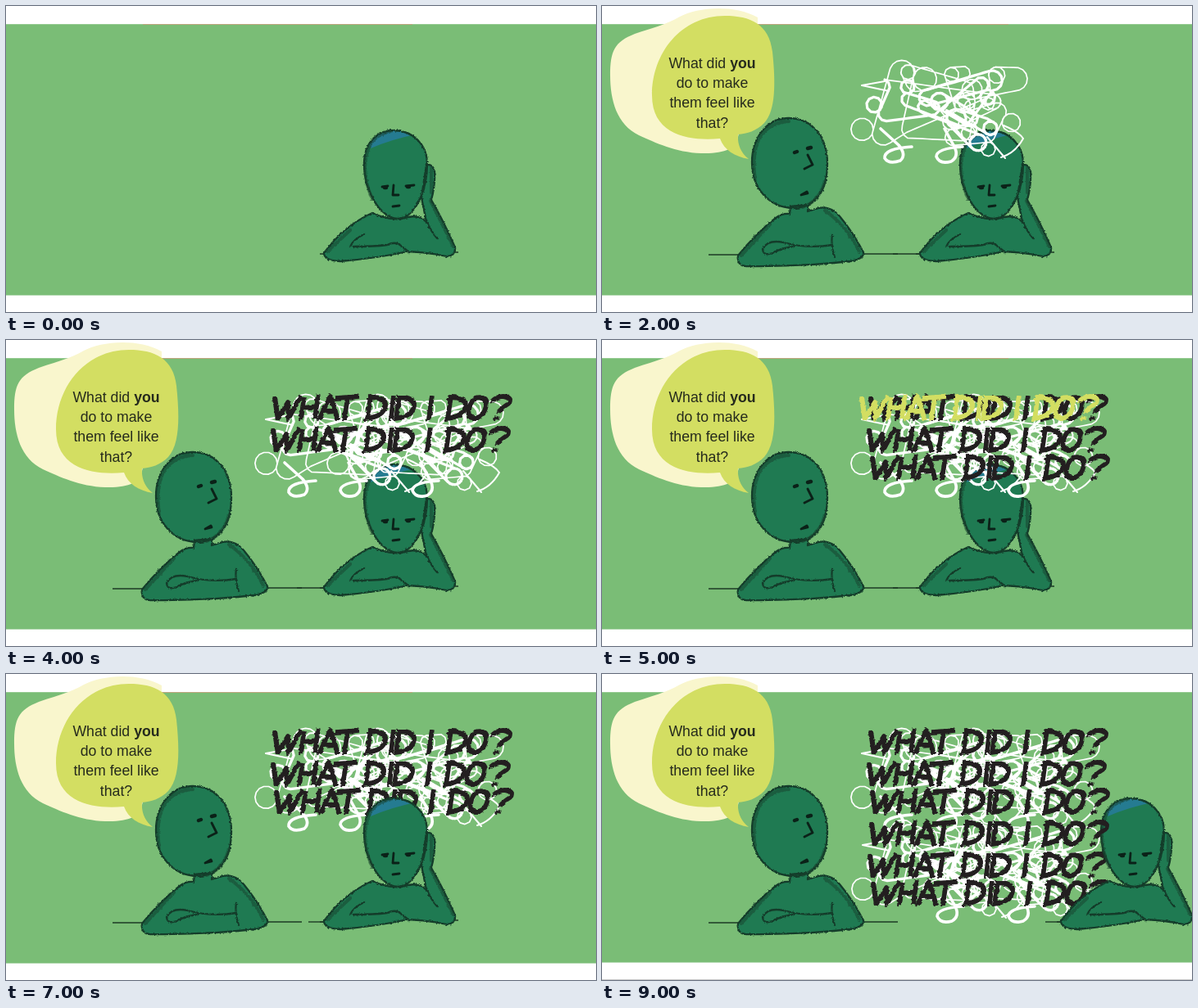
Write an HTML page that moves like this. It is 720 px wide and 374 px high and loops after 9500 ms.

```html
<!DOCTYPE html>
<html lang="en">
<head>
<meta charset="utf-8">
<title>What did I do?</title>
<style>
  html, body { margin: 0; width: 100%; height: 100%; overflow: hidden; background: #fff; }
  svg { display: block; width: 720px; height: 374px; }
  text { font: 17.7px "Liberation Sans", Arial, sans-serif; text-anchor: middle; fill: #262b1d; }
  filter { color-interpolation-filters: sRGB; }
  .skin { fill: #1f7a52; }
  .ink { fill: none; stroke: #143c2a; stroke-width: 2.3; stroke-linecap: round; stroke-linejoin: round; filter: url(#pencil); }
  .shade { stroke: #18402d; stroke-width: 4; opacity: .5; }
  .face { fill: none; stroke: #0b2118; stroke-width: 2.8; stroke-linecap: round; stroke-linejoin: round; }
  .eyes { stroke-width: 4.4; }
  .table { fill: none; stroke: #1c3a25; stroke-width: 1.4; }
  .scrawl { fill: none; stroke: #fff; stroke-linecap: round; stroke-linejoin: round; }
  .brush { fill: none; stroke-width: 5.6; stroke-linejoin: round; filter: url(#dry); }
</style>
</head>
<body>
<svg viewBox="0 0 720 374">
  <defs>
    <filter id="pencil" filterUnits="userSpaceOnUse" x="0" y="0" width="720" height="374">
      <feTurbulence type="fractalNoise" baseFrequency=".4" numOctaves="2" seed="4"/>
      <feDisplacementMap in="SourceGraphic" scale="3" xChannelSelector="R" yChannelSelector="G"/>
    </filter>
    <filter id="dry" filterUnits="userSpaceOnUse" x="-10" y="-10" width="320" height="60">
      <feTurbulence type="fractalNoise" baseFrequency=".12 .3" numOctaves="2" seed="9"/>
      <feDisplacementMap in="SourceGraphic" scale="3.5" xChannelSelector="R" yChannelSelector="G"/>
    </filter>
    <path id="head1" d="M228 137C256 137 275 160 275 192C275 226 260 247 233 247C203 246 183 222 183 191C183 160 202 137 228 137Z"/>
    <path id="body1" d="M230 245L229 254Q220 253 212 259Q188 278 166 305Q164 317 176 318Q240 319 303 312Q320 309 319 301Q306 276 290 257Q279 244 264 247L251 251L252 243Z"/>
    <path id="head2" d="M473 152C497 152 514 170 514 193C514 224 500 259 478 260C458 259 436 228 437 190C438 168 452 152 473 152Z"/>
    <path id="body2" d="M447 253Q412 269 388 302Q388 311 408 312Q455 308 490 300Q515 301 538 306Q549 305 548 295Q533 261 519 237Q524 218 523 202Q521 193 513 194L507 234L513 264Q503 253 483 260Q466 262 447 253Z"/>
    <clipPath id="skull"><use href="#head2"/></clipPath>

    <g id="worrier">
      <path class="table" d="M383 303H391M546 301H552"/>
      <use href="#body2" class="skin"/>
      <use href="#head2" class="skin"/>
      <path d="M440 150H500V157Q470 163 445 174Z" fill="#257b91" clip-path="url(#skull)"/>
      <g class="ink">
        <use href="#body2"/>
        <use href="#head2"/>
        <path d="M420 294Q424 285 437 279M424 294Q450 294 465 292Q476 287 482 293L492 301M513 262Q518 275 527 285"/>
        <path class="shade" d="M470 153Q446 158 441 178Q433 204 447 236M392 300L420 274M518 238L546 294M519 198V228"/>
      </g>
      <g class="face">
        <path d="M459 221L466 220M488 220L498 219M473 219L472 231H479M472 245L480 244"/>
        <path class="eyes" d="M462 222h2M490 221h2"/>
      </g>
    </g>

    <g id="asker">
      <path class="table" d="M130 304H180M310 303H361"/>
      <use href="#body1" class="skin"/>
      <use href="#head1" class="skin"/>
      <g class="ink">
        <use href="#body1"/>
        <use href="#head1"/>
        <path d="M281 280Q279 292 284 307M281 292Q250 297 222 289Q202 285 196 297Q197 306 208 302Q218 296 234 294"/>
        <path class="shade" d="M228 141Q207 142 194 158Q182 178 187 212M222 140L200 149M170 305L205 267M272 250Q298 268 314 300M245 246Q266 238 272 214"/>
      </g>
      <g class="face">
        <path class="eyes" d="M235 179L238 178M251 174L255 173"/>
        <path d="M251 182L257 194L247 199"/>
        <path d="M243 231L250 227L251 229Z" fill="#0b2118"/>
      </g>
    </g>

    <g id="bubble">
      <path fill="#f9f6cd" d="M10 85C10 55 15 44 40 34C60 27 78 23 95 13C115 2 160 -3 190 14V60L166 160C165 174 148 181 121 180C90 179 65 167 45 158C18 145 10 115 10 85Z"/>
      <path fill="#d3de62" d="M150 12C181 12 204 22 208 56C212 94 212 128 198 143C188 153 177 156 166 157C165 170 170 180 179 187C162 184 149 176 144 162C110 165 61 160 61 109C61 58 96 12 150 12Z"/>
    </g>
  </defs>

  <rect width="720" height="374" fill="#fff"/>
  <rect id="wall" y="22.2" width="720" fill="#7abd76"/>
  <path data-on="0 15" d="M167 22.5H496" stroke="#dc8d72" opacity=".6"/>
  <path data-on="18 19" d="M0 373.5H720" stroke="#ccc"/>

  <path data-on="1 14" class="table" d="M355 303H388"/>
  <use data-on="1 19" href="#asker"/>
  <use data-on="2 19" href="#bubble"/>
  <g data-on="3 19">
    <text x="134.5" y="76">What did <tspan font-weight="700">you</tspan></text>
    <text x="134.5" y="100">do to make</text>
    <text x="134.5" y="124">them feel like</text>
    <text x="134.5" y="149">that?</text>
  </g>
  <use data-on="0 14" href="#worrier"/>
  <g id="thoughts"></g>
  <g id="leaver" data-on="14 19">
    <path class="table" d="M369 303H392"/>
    <use href="#worrier"/>
  </g>
  <g id="front"></g>
</svg>

<script>
const $ = id => document.getElementById(id);
const STEP = 500, STEPS = 19;

let seed = 4711;
const rand = (a, b) => {
  seed = (seed * 16807) % 2147483647;
  return a + (b - a) * seed / 2147483647;
};

// A pen that steers towards random targets and now and then spins a full loop.
function scrawl(steps, width) {
  let x = 345, y = 90, a = 0, d = 'M345 90', tx, ty, turn, spin = 0, left = 0;
  for (let i = 0; i < steps; i++) {
    if (left-- <= 0 || Math.hypot(tx - x, ty - y) < 10) {
      tx = rand(328, 524); ty = rand(70, 168); turn = rand(.4, .8); left = 22;
      spin = rand(0, 1) < .5 ? Math.round(6.3 / turn) : 0;
    }
    const off = Math.atan2(ty - y, tx - x) - a;
    const bend = Math.atan2(Math.sin(off), Math.cos(off));
    a += spin-- > 0 ? turn : Math.max(-turn, Math.min(turn, bend));
    x += 6 * Math.cos(a);
    y += 6 * Math.sin(a);
    d += `L${x.toFixed(1)} ${y.toFixed(1)}`;
  }
  return `<path d="${d}" stroke-width="${width}"/>`;
}

const tangle = scrawl(260, 3.2) + scrawl(400, 1.7) +
  `<path stroke-width="2" d="M345 92L317 97L350 104M490 146Q509 154 514 162Q504 180 487 185M470 160L492 186"/>
   <path stroke-width="3.6" d="M440 172Q408 174 408 184Q412 194 426 190Q436 184 430 172L418 150"/>`;

const letterD = x => `M${x} 3l-4 28M${x - 3} 4q23 -1 21 11q-3 13 -24 15`;
const words = 'M2 3L6 30L18 10L19 30L34 2' +
  'M38 3L34 31M55 1L51 30M36 17L53 15' +
  'M56 31L70 2L79 31M61 21L76 20' +
  'M76 5L105 3M91 4L87 31' +
  letterD(119) + 'M147 2L144 31' + letterD(154) + 'M194 2L190 31' + letterD(217) +
  'M252 4Q261 4 260 14Q257 29 246 29Q237 29 239 19Q242 4 252 4' +
  'M267 9Q274 2 283 3Q293 5 287 12Q279 17 275 22M273 27L272 31';

const line = (x, y, from, to = STEPS, color = '#231f20') =>
  `<g data-on="${from} ${to}" transform="translate(${x} ${y})" stroke="${color}" role="img" aria-label="WHAT DID I DO?">
    <g class="brush"><path d="${words}"/><path d="${words}" stroke-width="2" transform="translate(-2 2)"/></g>
  </g>`;

const mess = (x, y, from) =>
  `<g class="scrawl" data-on="${from} ${STEPS}" transform="translate(${x} ${y})">${tangle}</g>`;

const rows = [[326, 66], [324, 105], [328, 139]];
const yellow = '#d3de62';

$('thoughts').innerHTML =
  mess(0, 0, 4) +
  `<path class="scrawl" data-on="4 19" stroke-width="3.6" d="M378 172Q344 174 345 186Q350 194 364 189Q372 182 362 170L340 150"/>` +
  mess(88, 0, 5) + mess(1, 112, 15) + mess(88, 112, 15) +
  rows.map(([x, y], i) => line(x, y, 7 + i)).join('') +
  rows.slice(1).map(([x, y]) => line(x + 1, y + 112, 15)).join('') +
  rows.map(([x, y], i) => line(x - 11, y, 10 + i, 11 + i, yellow)).join('');
$('front').innerHTML = line(327, 178, 15);

const timed = [...document.querySelectorAll('[data-on]')].map(el => [el, ...el.dataset.on.split(' ').map(Number)]);
const slide = [0, 41, 82, 136, 172];
let shown = -1;

function draw(now) {
  const step = Math.floor(Math.max(0, now) / STEP) % STEPS;
  if (step !== shown) {
    shown = step;
    for (const [el, from, to] of timed) el.style.display = step >= from && step < to ? '' : 'none';
    $('leaver').setAttribute('transform', `translate(${slide[Math.max(0, step - 14)]} 0)`);
    $('wall').setAttribute('height', step < 15 ? 331.4 : 330.4);
  }
  requestAnimationFrame(t => draw(t - start));
}

const start = performance.now();
draw(0);
</script>
</body>
</html>
```
